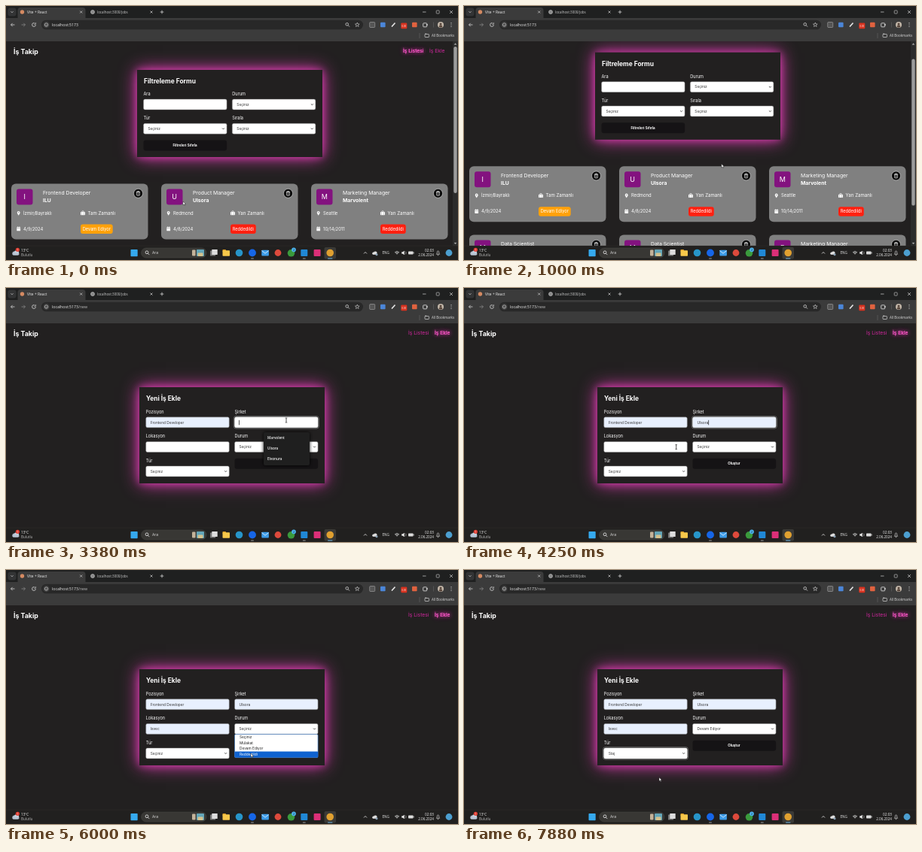
Write an HTML page with a canvas that moves like this. It is 600 px wide and 338 px high and loops after 8000 ms.

```html
<!DOCTYPE html>
<html lang="tr">
<head>
<meta charset="utf-8">
<title>İş Takip</title>
<style>
  html, body { margin: 0; width: 100%; height: 100%; overflow: hidden; background: #222120; }
  canvas { display: block; width: 600px; height: 338px; }
</style>
</head>
<body>
<canvas id="stage"></canvas>
<script>
const LOOP = 8000, STEP = 125;
const PAGE = 'Inter, sans-serif', UI = '"Open Sans", "Noto Sans", sans-serif';
const PINK = '#d3279f', DARK = '#222020';
const canvas = document.getElementById('stage');
const g = canvas.getContext('2d');
const ratio = window.devicePixelRatio || 1;
canvas.width = 600 * ratio;
canvas.height = 338 * ratio;

// Drawing helpers
function box(x, y, w, h, fill, r = 0, stroke, lw = 0.6) {
  g.beginPath();
  g.roundRect(x, y, w, h, r);
  if (fill) { g.fillStyle = fill; g.fill(); }
  if (stroke) { g.strokeStyle = stroke; g.lineWidth = lw; g.stroke(); }
}
function dot(x, y, r, fill, stroke, lw = 0.8) {
  box(x - r, y - r, 2 * r, 2 * r, fill, r, stroke, lw);
}
function line(points, color = '#ddd', lw = 0.8, fill) {
  g.beginPath();
  for (let i = 0; i < points.length; i += 2) g.lineTo(points[i], points[i + 1]);
  if (fill) { g.closePath(); g.fillStyle = fill; g.fill(); }
  g.strokeStyle = color;
  g.lineWidth = lw;
  g.stroke();
}
// y is the middle of the capitals
function text(s, x, y, size, color = '#fff', { weight = 400, align = 'left', font = PAGE } = {}) {
  g.font = `${weight} ${size}px ${font}`;
  g.textAlign = align;
  g.fillStyle = color;
  g.fillText(s, x, y + size * 0.36);
}
function glow(color, blur, draw) {
  g.save();
  g.shadowColor = color;
  g.shadowBlur = blur * ratio;
  draw();
  g.restore();
}
const cross = (x, y, s, c, lw) => {
  line([x - s, y - s, x + s, y + s], c, lw);
  line([x - s, y + s, x + s, y - s], c, lw);
};
const chevron = (x, y, c, s = 1.5) => line([x - s, y - s / 2, x, y + s / 2, x + s, y - s / 2], c, 0.8);

// Eased interpolation through [time, value, ...] keys
function at(keys, t) {
  const i = keys.findIndex(k => k[0] > t);
  if (i < 0) return keys[keys.length - 1].slice(1);
  const a = keys[i - 1], b = keys[i], u = (t - a[0]) / (b[0] - a[0]), e = u * u * (3 - 2 * u);
  return a.slice(1).map((v, n) => v + (b[n + 1] - v) * e);
}

const pointerKeys = [
  [0, 236, 262], [625, 268, 260], [875, 300, 240], [1375, 574, 62], [1500, 574, 62],
  [1875, 288, 183], [2125, 286, 180], [2500, 290, 199], [2625, 290, 199], [3000, 372, 176],
  [3375, 372, 176], [3750, 358, 213], [4000, 358, 213], [4375, 255, 211], [4500, 255, 211],
  [4750, 250, 233], [5000, 235, 247], [5125, 235, 247], [5500, 350, 212], [5625, 350, 212],
  [6000, 326, 246], [6250, 326, 238], [6375, 326, 238], [6750, 262, 244], [6875, 262, 244],
  [7250, 260, 278], [8000, 260, 278]
];
const scrollKeys = [[0, 0], [125, 8], [500, 90], [750, 90], [1125, 0], [8000, 0]];
const NAV_CLICK = 1500;

const ORANGE = ['Devam Ediyor', '#ffa10a'], RED = ['Reddedildi', '#ff2010'], GREEN = ['Mülakat', '#0c6e17'];
const FULL = 'Tam Zamanlı', PART = 'Yarı Zamanlı';
const jobs = [
  ['Frontend Developer', 'ILU', 'İzmir/Bayraklı', FULL, '4/9/2024', ORANGE],
  ['Product Manager', 'Ulsora', 'Redmond', PART, '4/8/2024', RED],
  ['Marketing Manager', 'Marvolent', 'Seattle', PART, '10/14/2011', RED],
  ['Data Scientist', 'Marvolent', 'Menlo Park', PART, '5/13/2024', ORANGE],
  ['Data Scientist', 'Marvolent', 'Menlo Park', FULL, '4/8/2024', GREEN],
  ['Marketing Manager', 'Elvonura', 'İstanbul', FULL, '5/26/2024', GREEN]
];

function header(right, active) {
  text('İş Takip', 10, 61, 8.8, '#fff', { weight: 700 });
  ['İş Listesi', 'İş Ekle'].forEach((s, i) => {
    const x = right - (i ? 21 : 56);
    const draw = () => text(s, x, 60, 6.7, i === active ? '#e04fb2' : PINK);
    if (i === active) { glow('#e03cb4', 7, draw); glow('#e03cb4', 4, draw); }
    draw();
  });
}

function panel(x, y, w, h, title) {
  glow('#f040c0', 22, () => box(x, y, w, h, DARK));
  glow('#e63cb8aa', 9, () => box(x, y, w, h, DARK));
  text(title, x + 9, y + 15, 8.4, '#fff', { weight: 700 });
}

function field(x, y, label, value = '', { select, focus, auto, caret } = {}) {
  text(label, x, y - 7, 5.6);
  if (focus) box(x - 1.2, y - 1.2, 113, 16.4, '#101010', 3, '#8b8b8b', 0.7);
  box(x, y, 110.6, 14, auto ? '#e8f0fe' : '#fff', 2, focus ? '#fff' : '#777', 0.5);
  text(value, x + 6, y + 7, 4.8, '#333');
  if (select) chevron(x + 106, y + 7, '#222', 1.4);
  if (caret) {
    const end = value ? x + 6.5 + g.measureText(value).width : x + 6;
    line([end, y + 4, end, y + 10.5], '#111', 0.7);
  }
}

function button(x, y, label) {
  box(x, y, 110.6, 14, '#151315', 3);
  text(label, x + 55, y + 7, 4.5, '#fff', { weight: 700, align: 'center' });
}

function pin(x, y) {
  line([x - 1.7, y, x, y + 3, x + 1.7, y], '#fff', 0.3, '#fff');
  dot(x, y - 0.7, 1.9, '#fff');
  dot(x, y - 0.7, 0.7, '#808080');
}
function briefcase(x, y) {
  box(x - 1.2, y - 2.6, 2.4, 2, null, 0.5, '#fff', 0.7);
  box(x - 3, y - 1.4, 6, 4.2, '#fff', 0.7);
  line([x - 1.5, y - 1.4, x - 1.5, y + 2.8], '#808080', 0.4);
  line([x + 1.5, y - 1.4, x + 1.5, y + 2.8], '#808080', 0.4);
}
function calendar(x, y) {
  box(x - 2.4, y - 2.2, 4.8, 5, '#fff', 0.6);
  line([x - 1.2, y - 3, x - 1.2, y - 1.5], '#fff', 0.7);
  line([x + 1.2, y - 3, x + 1.2, y - 1.5], '#fff', 0.7);
  line([x - 2.4, y - 0.8, x + 2.4, y - 0.8], '#808080', 0.5);
}
function trash(x, y) {
  dot(x, y, 6, '#050505', '#ddd', 0.6);
  box(x - 1.9, y - 1.7, 3.8, 4.6, null, 0.5, '#fff', 0.7);
  line([x - 2.7, y - 2, x + 2.7, y - 2], '#fff', 0.7);
  line([x - 0.9, y - 3, x + 0.9, y - 3], '#fff', 0.7);
  line([x, y - 0.7, x, y + 2], '#fff', 0.6);
}

function card([title, firm, place, kind, date, [status, color]], x, y) {
  box(x, y, 181.5, 74, '#808080', 6);
  box(x + 7, y + 7, 21.5, 21, '#83127f', 3);
  text(firm[0], x + 17.7, y + 17.5, 9, '#fff', { align: 'center' });
  text(title, x + 42, y + 12.5, 6.8);
  text(firm, x + 42, y + 22, 6.8, '#fff', { weight: 700 });
  trash(x + 168.5, y + 12.8);
  pin(x + 9.7, y + 39);
  text(place, x + 16, y + 39, 5.9);
  briefcase(x + 95, y + 39);
  text(kind, x + 101.5, y + 39, 6.1);
  calendar(x + 9.7, y + 60);
  text(date, x + 16, y + 60, 5.9);
  g.font = `400 5.7px ${PAGE}`;
  box(x + 92, y + 54, g.measureText(status).width + 5.5, 12.5, color, 3);
  text(status, x + 94.7, y + 60.2, 5.7);
}

function listPage(t) {
  const [scroll] = at(scrollKeys, t);
  g.save();
  g.translate(0, -scroll);
  header(583, 0);
  panel(174, 85, 246, 116, 'Filtreleme Formu');
  const pick = { select: true };
  field(182.5, 124, 'Ara');
  field(300.3, 124, 'Durum', 'Seçiniz', pick);
  field(182.5, 156.3, 'Tür', 'Seçiniz', pick);
  field(300.3, 156.3, 'Sırala', 'Seçiniz', pick);
  button(182.5, 178.5, 'Filtreleri Sıfırla');
  jobs.forEach((job, i) => card(job, 7 + (i % 3) * 199, 236.5 + Math.floor(i / 3) * 91.3));
  g.restore();

  box(593, 47, 7, 272, '#2c2c2c');
  box(594.3, 54 + scroll * 64 / 90, 4.4, 195, '#9d9d9d', 2.2);
  line([595, 51.5, 596.5, 49.5, 598, 51.5], '#aaa', 0.3, '#aaa');
  line([595, 315, 596.5, 317, 598, 315], '#aaa', 0.3, '#aaa');
}

// Autofill list, centred on the place of the click
function suggestions(mid, y, items, hover) {
  const x = mid - 30.5;
  glow('#000', 4, () => box(x, y, 61, 14 * items.length + 2, '#1f1f1f', 2));
  items.forEach((s, i) => {
    const cy = y + 7.5 + i * 14;
    if (i === hover) {
      box(x, cy - 6.8, 61, 13.6, '#3c3c3e');
      cross(x + 52, cy, 1.4, '#ddd', 0.6);
    }
    text(s, x + 5, cy, 4.6, '#f2f2f2', { weight: 600, font: UI });
  });
}

function options(x, y, items, pointerY) {
  const h = 7.6;
  box(x, y, 110.6, h * items.length + 0.6, '#fff', 1.5, '#2a6fc0', 0.6);
  const hover = Math.min(items.length - 1, Math.max(0, Math.floor((pointerY - y) / h)));
  items.forEach((s, i) => {
    if (i === hover) box(x, y + i * h, 110.6, h + 0.4, '#0f62d0', 1);
    text(s, x + 6.5, y + (i + 0.5) * h, 4.8, i === hover ? '#fff' : '#222');
  });
}

function formPage(t, py) {
  const within = (a, b) => t >= a && t < b;
  const shown = (from, s, empty = '') => t >= from ? s : empty;
  const blink = t % 1000 < 500;
  header(590, 1);
  panel(177, 132, 246, 128, 'Yeni İş Ekle');
  const input = (x, y, label, value, from, a, b) => field(x, y, label, shown(from, value),
    { auto: t >= from, focus: within(a, b), caret: within(a, b) && blink });
  const select = (x, y, label, value, from, a, b) => field(x, y, label, shown(from, value, 'Seçiniz'),
    { select: true, focus: within(a, b) });
  input(185.7, 171.8, 'Pozisyon', 'Frontend Developer', 2500, 2125, 3000);
  input(303.5, 171.8, 'Şirket', 'Ulsora', 3750, 3000, 4500);
  input(185.7, 204.4, 'Lokasyon', 'Isvec', 4875, 4500, 5625);
  select(303.5, 204.4, 'Durum', 'Devam Ediyor', 6375, 6375, 6875);
  select(185.7, 236.9, 'Tür', 'Staj', 7375, 7375, LOOP);
  button(303.5, 226.8, 'Oluştur');

  if (within(2125, 2625)) suggestions(288, 192, ['Frontend Developer'], t >= 2500 ? 0 : -1);
  if (within(3125, 4000)) suggestions(372.5, 192, ['Marvolent', 'Ulsora', 'Elvonura'],
    t >= 3750 ? 1 : t >= 3625 ? 0 : -1);
  if (within(4500, 5125)) suggestions(255.5, 224.5, ['Izmir', 'Isvec', 'Oslo'],
    t >= 4875 ? 1 : t >= 4750 ? 0 : -1);
  if (within(5625, 6375)) options(303.5, 218.6, ['Seçiniz', 'Mülakat', 'Devam Ediyor', 'Reddedildi'], py);
  if (within(6875, 7375)) options(185.7, 251.2, ['Seçiniz', FULL, PART, 'Staj'], py);
}

function linkHint(t) {
  if (t < 1375 || t > 1900) return;
  g.save();
  if (t > 1800) g.globalAlpha = 0.4;
  else box(-2, 310.5, 50, 10, '#3c3c3c', 2);
  text('localhost:5173/new', 1.5, 315.2, 4.6, '#bbb', { font: UI });
  g.restore();
}

function browser(t) {
  const ui = { font: UI };
  const c = '#d5d5d5';
  box(0, 0, 600, 20, '#1f2020');
  box(0, 16, 600, 31, '#3b3b3b');
  box(2.5, 2.5, 11, 11, '#333435', 3);
  chevron(8, 8, c);
  box(15.5, 2, 90, 18, '#3b3b3b', 4);
  dot(21.5, 8, 2.7, '#d58a62');
  text('Vite + React', 28, 8, 4.9, '#eee', ui);
  cross(99.7, 8, 1.5, c, 0.7);
  dot(115, 8, 2.5, '#888', '#ccc', 0.6);
  text('localhost:3000/jobs', 121, 8, 4.5, '#ccc', ui);
  cross(193, 8, 1.5, c, 0.7);
  line([204.7, 8, 209.3, 8], c);
  line([207, 5.7, 207, 10.3], c);
  line([553, 8, 557.5, 8], c, 0.7);
  box(571.2, 6, 4, 4, null, 0.7, c);
  cross(591, 8, 2, c, 0.7);

  line([11.5, 25, 6.5, 25], c);
  line([8.7, 22.8, 6.5, 25, 8.7, 27.2], c);
  line([20.5, 25, 25.5, 25], '#888');
  line([23.3, 22.8, 25.5, 25, 23.3, 27.2], '#888');
  g.beginPath();
  g.arc(37, 25, 2.4, 0, 5.2);
  g.strokeStyle = c;
  g.lineWidth = 0.8;
  g.stroke();
  line([39.4, 22, 39.4, 24.2, 37.2, 24.2], c, 0.7);
  box(47, 18.7, 427, 12.6, '#282828', 6.3);
  dot(53.5, 25, 4.4, '#3b3b3b');
  dot(53.5, 25, 2.2, null, c, 0.7);
  line([53.5, 24.6, 53.5, 26.3], c, 0.6);
  text('localhost:5173', 61, 25, 5.2, '#eee', ui);
  if (t >= NAV_CLICK) {
    g.font = `400 5.2px ${UI}`;
    const w = g.measureText('localhost:5173').width;
    text('/new', 61 + w, 25, 5.2, '#bbb', ui);
  }
  dot(452.7, 24.3, 1.8, null, c);
  line([454, 25.6, 456, 27.6], c);
  const star = [];
  for (let i = 0; i <= 10; i++) {
    const r = i % 2 ? 1.3 : 3, a = i * Math.PI / 5 - Math.PI / 2;
    star.push(466.3 + r * Math.cos(a), 25 + r * Math.sin(a));
  }
  line(star, c, 0.6);

  box(482.7, 21.5, 7, 7, '#555', 1, '#aaa');
  box(497, 21.7, 6.6, 6.6, '#4b86d8', 1);
  line([512, 27.5, 516.5, 22.5], '#e8e8e8', 1.6);
  box(524.3, 22.5, 8, 7.8, '#d8321f', 1.2);
  text('0.00', 528.3, 27.3, 3, '#fff', { align: 'center', font: UI });
  box(539, 21.7, 6.6, 6.6, '#e0623f', 1);
  box(553.7, 22.8, 5, 5, null, 0.8, c, 0.9);
  dot(558.8, 25, 1, c);
  line([567.5, 21.5, 567.5, 28.5], '#666', 0.6);
  dot(577, 25, 4, '#c3b7a9');
  dot(577, 23.9, 1.5, '#57453b');
  box(574.8, 25.6, 4.4, 3, '#57453b', 1.5);
  for (const y of [22.7, 25, 27.3]) dot(591, y, 0.6, c);
  line([549, 36, 549, 43], '#666', 0.6);
  box(556, 37.5, 5.4, 4, null, 0.6, c, 0.7);
  line([556, 37, 558.4, 37], c, 0.7);
  text('All Bookmarks', 565, 39.5, 4.5, '#ddd', ui);
}

function taskbar() {
  const ui = { font: UI }, right = { font: UI, align: 'right' }, c = '#eee', y = 328.5;
  box(0, 319, 600, 19, '#21201f');
  line([0, 319.2, 600, 319.2], '#35342f', 0.4);
  dot(11, 329, 2.6, '#aab6c6');
  dot(14, 328.4, 3.2, '#c7d1de');
  box(8.5, 328.6, 9, 3, '#b9c5d4', 1.5);
  dot(15.4, 324.3, 2.6, '#e03d32');
  text('1', 15.4, 324.3, 3.6, '#fff', { font: UI, align: 'center' });
  text('13°C', 20, 325.2, 4.7, c, ui);
  text('Bulutlu', 20, 331.8, 4.6, '#bbb', ui);

  box(165.5, 324, 9.2, 9.2, '#35a9ee', 0.8);
  box(179.5, 322, 86.5, 13, '#383734', 6.5, '#4b4a46', 0.5);
  dot(187, 327.8, 1.9, null, c);
  line([188.4, 329.2, 190.3, 331.1], c);
  text('Ara', 194, y, 5.2, '#ddd', ui);
  box(247, 324.5, 4.6, 8, '#c4b39a', 1);
  box(253, 324, 10, 9, '#64a6b8', 1);
  box(254.5, 328.5, 7, 4.5, '#d5c28e', 1);

  box(271, 325.5, 7, 7, '#777', 0.6);
  box(273.3, 324, 7.4, 7, '#ddd', 0.6);
  box(287.5, 324, 4.5, 3, '#d79a25', 0.8);
  box(287.5, 325.3, 9.5, 7.5, '#f7c84b', 0.8);
  dot(309.5, y, 4.8, '#2795c9');
  dot(327, y, 4.9, '#1666e8');
  box(339.3, 324.7, 9.6, 7.8, '#3d9ce8', 1);
  line([339.5, 325.5, 344, 329.2, 348.7, 325.5], '#dff0ff', 0.9);
  dot(361, y, 4.4, '#dd4a3c');
  dot(378.5, 328.8, 4.8, '#3a9a3c');
  dot(382, 324.4, 2.8, '#4cb4ee');
  text('2', 382, 324.4, 3.8, '#10202c', { font: UI, align: 'center' });
  box(391.3, 324, 9, 9, '#2088d6', 1);
  box(408.6, 324, 9, 9, '#db2f78', 1);
  box(422.5, 321, 15.5, 15.5, '#3b3a37', 2);
  dot(430.2, y, 4.8, '#e0a030');
  box(325, 335.6, 4, 0.9, '#999', 0.4);
  box(393.8, 335.6, 4, 0.9, '#999', 0.4);
  box(427, 335.6, 6.5, 0.9, '#6fb7e8', 0.4);

  line([475, 329.5, 477, 327.5, 479, 329.5], c);
  dot(488, 329.3, 1.8, '#ddd');
  dot(490.3, 328.7, 2.3, '#ddd');
  dot(492, 330.7, 1.5, '#8aa0b4');
  text('ENG', 499.5, y, 4.6, c, ui);
  g.strokeStyle = c;
  g.lineWidth = 0.7;
  for (const r of [1.4, 2.9, 4.3]) {
    g.beginPath();
    g.arc(519, 331, r, -2.35, -0.8);
    g.stroke();
  }
  line([525.5, 327.6, 527, 327.6, 528.5, 326, 528.5, 331, 527, 329.4, 525.5, 329.4], c, 0.5, c);
  g.beginPath();
  g.arc(528.5, 328.5, 2.5, -0.9, 0.9);
  g.stroke();
  box(534, 326.5, 6.5, 4, '#ddd', 0.8);
  box(540.7, 327.6, 0.8, 1.8, '#ddd');
  text('02:03', 568, 325.2, 4.7, c, right);
  text('2.06.2024', 568, 331.8, 4.6, c, right);
  line([571.4, 330.3, 572.3, 329, 572.3, 327, 573.5, 325.7, 574.7, 327, 574.7, 329, 575.6, 330.3, 571.4, 330.3], c, 0.6);
  line([572.8, 331.6, 574.2, 331.6], c, 0.7);
  dot(588, y, 4.4, '#4c9fd0');
}

function pointer(x, y, beam) {
  if (beam) {
    line([x, y - 3, x, y + 3], '#222', 0.8);
    line([x - 1.3, y - 3, x + 1.3, y - 3], '#222', 0.6);
    line([x - 1.3, y + 3, x + 1.3, y + 3], '#222', 0.6);
    return;
  }
  const shape = [0, 0, 0, 5, 1.2, 3.9, 2, 5.7, 2.8, 5.3, 2, 3.6, 3.6, 3.6, 0, 0];
  line(shape.map((v, i) => v + (i % 2 ? y - 2 : x - 1)), '#222', 0.5, '#fff');
}

// Text fields show a beam while no list lies under the pointer
function overInput(t, x, y) {
  if (t < NAV_CLICK) return false;
  const left = x > 186 && x < 296;
  return (y > 172 && y < 186 && (left || x > 304 && x < 414)) || (left && y > 204.5 && y < 218.5);
}

function draw(t) {
  const [x, y] = at(pointerKeys, t);
  g.setTransform(ratio, 0, 0, ratio, 0, 0);
  box(0, 0, 600, 338, DARK);
  g.save();
  g.beginPath();
  g.rect(0, 47, 600, 272);
  g.clip();
  if (t < NAV_CLICK) listPage(t);
  else formPage(t, y);
  linkHint(t);
  g.restore();
  browser(t);
  taskbar();
  pointer(x, y, overInput(t, x, y));
}

const start = performance.now();
function tick() {
  const t = (performance.now() - start) % LOOP;
  draw(Math.floor(t / STEP) * STEP);
  requestAnimationFrame(tick);
}
tick();
</script>
</body>
</html>
```
